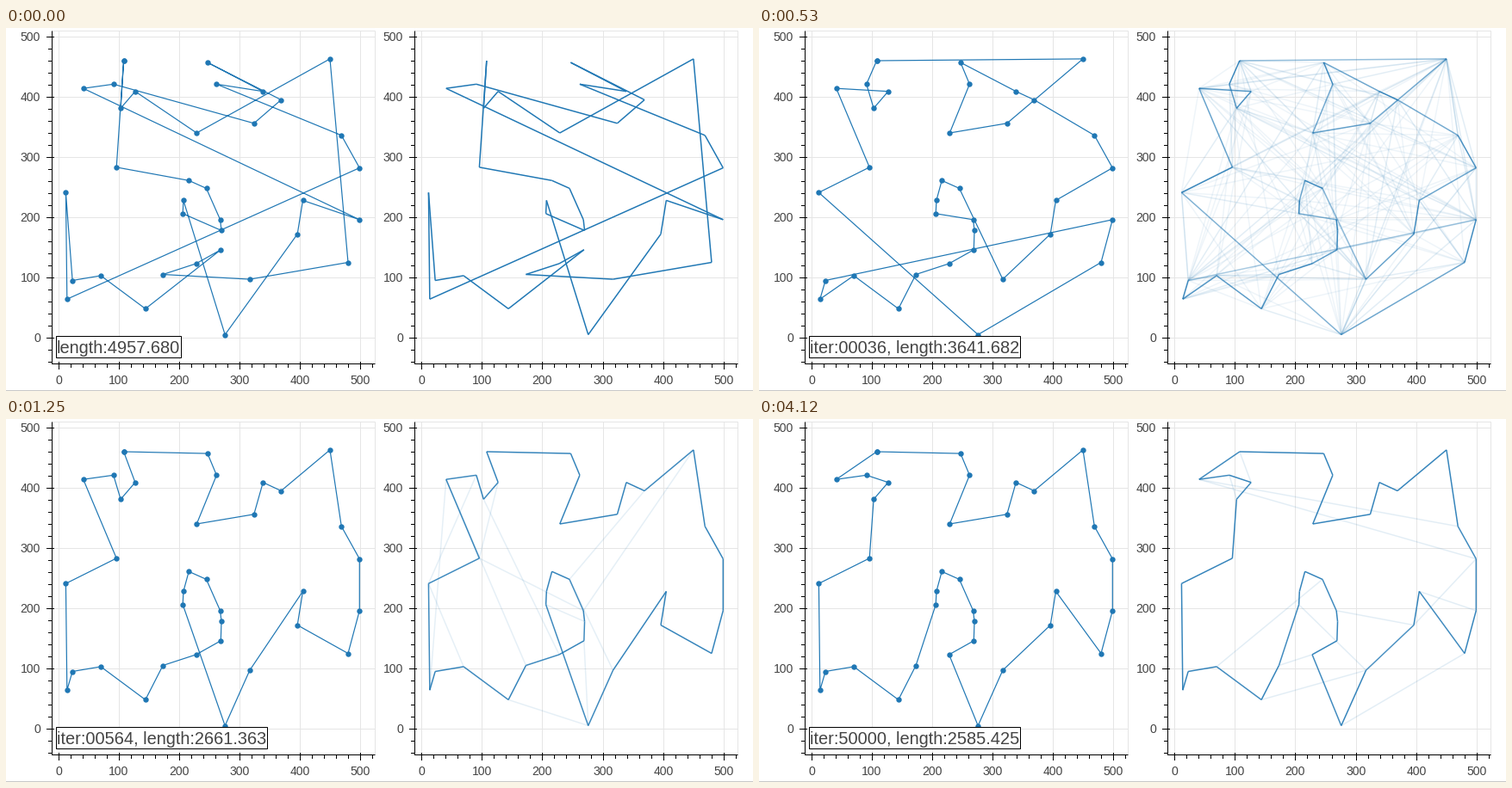
A matplotlib script for the animation above (4.39 s loop, 867x422 px).

```python
import numpy as np
import matplotlib.pyplot as plt
from matplotlib.animation import FuncAnimation
from matplotlib.collections import LineCollection
from matplotlib.colors import to_rgb
from matplotlib.patches import Rectangle

W, H, DPI = 867, 422, 64
PX = 72 / DPI  # points per pixel
LOOP, STEP = 4390, 10
BLUE, GRID, INK = "#1f77b4", "#e5e5e5", "#444444"
UNIT, UNIT_RIGHT, SHIFT = 0.7, 0.702, 421  # plot scales and distance between plots

# Cities in the order of the shortest tour
CITIES = np.array([
    (108, 460), (247, 457), (262, 421), (229, 340), (324, 356), (339, 409), (369, 395),
    (450, 463), (469, 336), (499, 282), (499, 196), (480, 125), (405, 228), (396, 172),
    (317, 97), (276, 5), (228, 123), (269, 146), (270, 178), (268, 196), (245, 248),
    (216, 261), (207, 228), (206, 206), (173, 105), (144, 48), (70, 103), (23, 95),
    (14, 64), (12, 241), (96, 283), (103, 381), (127, 409), (91, 421), (41, 414)])
N = len(CITIES)
DIST = np.hypot(*(CITIES[:, None] - CITIES[None]).transpose(2, 0, 1))
LEFT = np.array([61, 360]) + CITIES * [UNIT, -UNIT]
RIGHT = np.array([61 + SHIFT, 360]) + CITIES * [UNIT_RIGHT, -UNIT]


# ---- search ----
def spans(*parts):
    """Join single cities and runs (first, last), forwards or backwards."""
    tour = []
    for part in parts:
        a, b = part if isinstance(part, tuple) else (part, part)
        step = 1 if b >= a else -1
        tour += range(a, b + step, step)
    return tour


def length(tour):
    return DIST[tour, np.roll(tour, -1)].sum()


def improve(tour, moves=1):
    """Apply the best segment reversal a number of times."""
    for _ in range(moves):
        options = [tour[:i] + tour[i:j][::-1] + tour[j:]
                   for i in range(1, N - 1) for j in range(i + 2, N + 1)]
        tour = min(options, key=length)
    return tour


def links(tour):
    return [(min(e), max(e)) for e in zip(tour, tour[1:] + tour[:1])]


def trail(tour, k):
    """Share of random ants on each link; later ants follow the tour more closely."""
    if k == 0:
        return dict.fromkeys(links(tour), 1.0)
    rng = np.random.default_rng(k)
    ants = 8 + 80 // k
    pull = 1 / (DIST + np.eye(N)) ** 2
    for a, b in links(tour):
        pull[[a, b], [b, a]] *= 2 * k * k
    count = {}
    for _ in range(ants):
        path, free = [int(rng.integers(N))], np.ones(N)
        while len(path) < N:
            free[path[-1]] = 0
            odds = pull[path[-1]] * free
            path.append(int(rng.choice(N, p=odds / odds.sum())))
        for link in links(path):
            count[link] = count.get(link, 0) + 1
    return {link: 0.9 * (c / ants) ** 0.75 for link, c in count.items()}


START = spans(0, (31, 32), 3, 7, 11, 14, 24, (16, 17), (25, 27), (29, 28), (9, 8), 2, 5, 1,
              6, 4, (33, 34), 10, (12, 13), 15, (22, 23), (18, 21), 30)
ROUGH = spans(0, 33, 1, (5, 4), 8, 6, (2, 3), (17, 19), (23, 20), 26, 7, 9, 15, (13, 12),
              (10, 11), 14, 16, (24, 25), (28, 27), (29, 30), 34, (31, 32))
LOOSE = spans(0, 7, (4, 1), (5, 6), (8, 9), (12, 14), (20, 23), (19, 16), (24, 26),
              (28, 27), (10, 11), 15, (29, 30), 34, (32, 31), 33)
FAIR = spans(0, 30, (3, 7), (2, 1), (8, 11), (13, 12), (15, 14), (20, 23), (19, 16),
             (24, 29), (34, 33), (31, 32))
GOOD = spans((0, 11), (13, 12), (14, 15), (23, 16), (24, 30), (34, 33), (31, 32))
BETTER = spans((0, 11), (13, 12), (14, 31), (34, 32))
BEST = spans((0, N - 1))

# start time, iteration, tour, shown length (None: measured)
STATES = [
    (0, None, START, 4957.680),
    (200, 4, improve(START, 2), None),
    (330, 12, ROUGH, 4035.678),
    (400, 16, improve(ROUGH), None),
    (530, 36, LOOSE, 3641.682),
    (660, 52, improve(LOOSE), None),
    (790, 68, FAIR, 3074.906),
    (860, 92, improve(FAIR), None),
    (990, 152, improve(FAIR), None),
    (1120, 300, improve(FAIR, 2), None),
    (1250, 564, GOOD, 2661.363),
    (1450, 1936, BETTER, None),
    (1720, 6612, BEST, 2585.425),
    (4120, 50000, BEST, 2585.425),
]
TIMES = [state[0] for state in STATES]
TRAILS = [trail(state[2], k) for k, state in enumerate(STATES)]

# ---- stage ----
fig = plt.figure(figsize=(W / DPI, H / DPI), dpi=DPI, facecolor="white")
ax = fig.add_axes([0, 0, 1, 1])
ax.set_xlim(0, W)
ax.set_ylim(H, 0)
ax.axis("off")


def rules(segments, color, z):
    ax.add_collection(LineCollection(segments, colors=color, linewidths=PX, zorder=z,
                                     capstyle="butt", snap=False), autolim=False)


def label(x, y, text, size, **kw):
    return ax.text(x, y, text, fontsize=size * PX, family="Liberation Sans",
                   color=INK, va="baseline", **kw)


def panel(dx, scale):
    left, right, top, bottom = 53.5 + dx, 428.5 + dx, 3.5, 390.5
    grid = [[(left, top), (right, top)], [(right, top), (right, bottom)]]
    axes = [[(left, top), (left, bottom + 0.5)], [(left - 0.5, bottom), (right, bottom)]]
    for v in range(-40, 521, 20):
        x = np.floor(61.5 + dx + scale * v) + 0.5
        y = np.floor(360.5 - UNIT * v) + 0.5
        major = v % 100 == 0
        inner, outer = (2.5, 6.5) if major else (0, 4.5)
        if v >= 0:
            axes.append([(x, bottom - inner), (x, bottom + outer)])
        if v <= 500:
            axes.append([(left - outer, y), (left + inner, y)])
        if major:
            grid += [[(x, top), (x, bottom)], [(left, y), (right, y)]]
            label(x - 0.5, 414, str(v), 14, ha="center")
            label(40 + dx, y + 4.5, str(v), 14, ha="right")
    rules(grid, GRID, 1)
    rules(axes, "black", 2)


panel(0, UNIT)
panel(SHIFT, UNIT_RIGHT)
rules([[(0, 421.5), (W, 421.5)]], "#c8c8c8", 1)

route, = ax.plot([], [], color=BLUE, lw=1.2 * PX, marker="o", ms=6.4 * PX, mew=0,
                 zorder=4, snap=False)
web = LineCollection([], linewidths=1.5 * PX, zorder=4, snap=False)
ax.add_collection(web, autolim=False)
box = Rectangle((58.5, 358.5), 145, 25, fc="white", ec="black", lw=PX, zorder=5, snap=False)
ax.add_patch(box)
caption = label(59, 378, "", 20, zorder=6)


def draw(frame):
    now = np.searchsorted(TIMES, frame * STEP, side="right") - 1
    _, count, tour, shown = STATES[now]
    edges = TRAILS[now]
    route.set_data(*LEFT[tour + tour[:1]].T)
    web.set_segments([RIGHT[list(e)] for e in edges])
    web.set_color([(*to_rgb(BLUE), w) for w in edges.values()])
    prefix = "" if count is None else f"iter:{count:05d}, "
    caption.set_text(f"{prefix}length:{shown or length(tour):.3f}")
    box.set_width(245 if prefix else 145)
    return route, web, box, caption


anim = FuncAnimation(fig, draw, frames=LOOP // STEP, interval=STEP, repeat=True,
                     repeat_delay=0, init_func=lambda: draw(0), blit=False)
plt.show()
```
